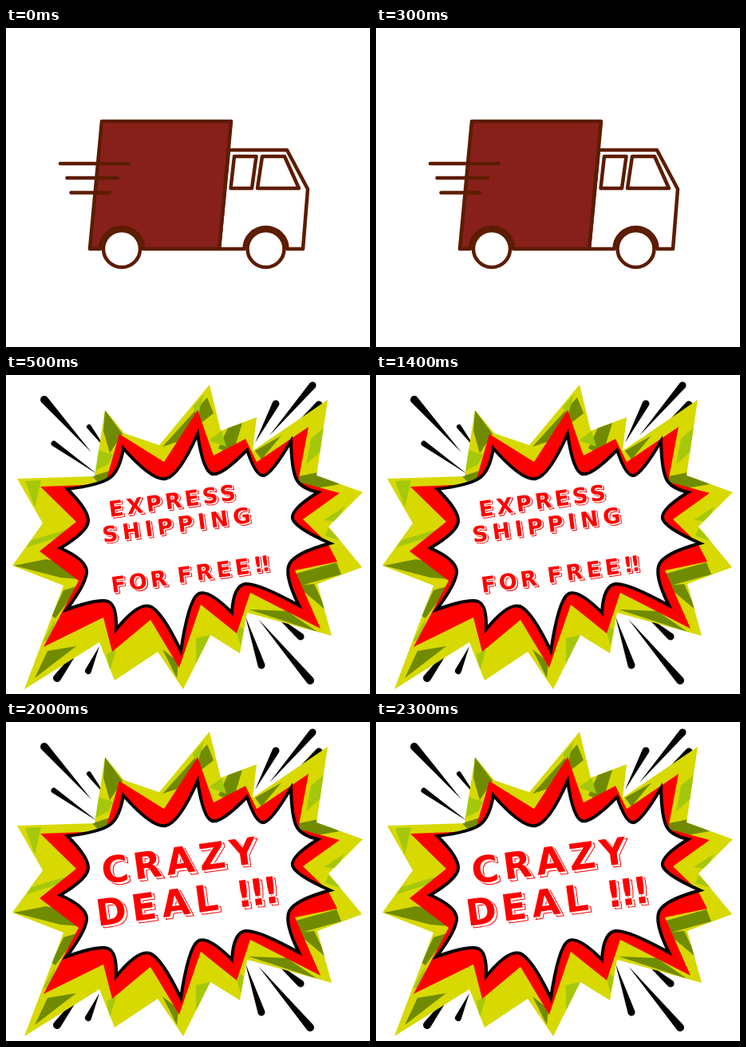
Animation of 456 by 400 pixels, one loop 2500 ms. Source, as an HTML page with a canvas:

```html
<!DOCTYPE html>
<html lang="en">
<head>
<meta charset="utf-8">
<title>Express shipping</title>
<style>
html, body { margin: 0; width: 100%; height: 100%; overflow: hidden; background: #fff; }
canvas { display: block; }
</style>
</head>
<body>
<canvas id="stage" width="456" height="400"></canvas>
<script>
const ctx = document.getElementById('stage').getContext('2d');
const LOOP = 2500, BURST_AT = 500, DEAL_AT = 2000;
const BROWN = '#5c1c00', MAROON = '#87201a', RED = '#ff0000';
const YELLOW = '#d7d900', OLIVE = '#718b00', LIME = '#a5c80a';

function poly(pts, fill, stroke) {
  ctx.beginPath();
  for (let i = 0; i < pts.length; i += 2) ctx.lineTo(pts[i], pts[i + 1]);
  ctx.closePath();
  if (fill) { ctx.fillStyle = fill; ctx.fill(); }
  if (stroke) ctx.stroke();
}

function line(x1, y1, x2, y2) {
  ctx.beginPath();
  ctx.moveTo(x1, y1);
  ctx.lineTo(x2, y2);
  ctx.stroke();
}

function drawTruck() {
  ctx.strokeStyle = BROWN;
  ctx.lineWidth = 4.5;
  ctx.lineCap = ctx.lineJoin = 'round';

  const body = (start, wheelX, fill) => {
    ctx.beginPath();
    for (const [x, y] of start) ctx.lineTo(x, y);
    ctx.arc(wheelX, 277, 27, 0, Math.PI, true);
    ctx.lineTo(wheelX < 200 ? 105 : 267, 277);
    ctx.closePath();
    ctx.fillStyle = fill;
    ctx.fill();
    ctx.stroke();
  };
  body([[279, 153], [352, 153], [378, 202], [372, 277]], 325.5, '#fff');
  body([[120, 117], [282, 117], [267, 277]], 145, MAROON);
  poly([286, 161, 313.5, 161, 308, 201, 281.5, 201], '#fff', true);
  poly([321, 161, 349, 161, 367, 201, 315, 201], '#fff', true);

  for (const x of [145, 325.5]) {
    ctx.beginPath();
    ctx.arc(x, 277, 23, 0, 7);
    ctx.fillStyle = '#fff';
    ctx.fill();
    ctx.stroke();
  }
  line(68, 170, 154, 170);
  line(76.5, 188, 140, 188);
  line(81.5, 206.5, 130, 206.5);
}

// Tapered streak: round head, pointed tail.
function streak(x, y, r, tx, ty) {
  const a = Math.atan2(ty - y, tx - x);
  ctx.fillStyle = '#000';
  ctx.beginPath();
  ctx.arc(x, y, r, a + Math.PI / 2, a - Math.PI / 2);
  ctx.lineTo(tx, ty);
  ctx.fill();
}

// Sharp tips alternating with rounded valleys.
function bubble(p) {
  const n = p.length;
  ctx.beginPath();
  ctx.moveTo(p[0], p[1]);
  for (let i = 0; i < n; i += 4) {
    const [ax, ay, vx, vy] = p.slice(i, i + 4);
    const bx = p[(i + 4) % n], by = p[(i + 5) % n];
    const dx = (bx - ax) * 0.18, dy = (by - ay) * 0.18;
    ctx.quadraticCurveTo(vx - dx, vy - dy, vx, vy);
    ctx.quadraticCurveTo(vx + dx, vy + dy, bx, by);
  }
  ctx.closePath();
  ctx.fillStyle = '#fff';
  ctx.fill();
  ctx.strokeStyle = '#000';
  ctx.lineWidth = 4;
  ctx.lineJoin = 'miter';
  ctx.stroke();
}

function drawBurst() {
  streak(48, 31, 5, 107, 97);
  streak(60, 86, 3.5, 114, 124);
  streak(104, 65, 3, 126, 94);
  streak(338, 36, 4.5, 312, 85);
  streak(384, 13, 4.5, 330, 76);
  streak(392, 37, 4.5, 350, 75);
  streak(64, 380, 5, 98, 334);
  streak(103, 371, 4, 117, 340);
  streak(320, 364, 4.5, 300, 303);
  streak(381, 383, 5, 316, 306);
  streak(369, 328, 4.5, 336, 300);

  ctx.save();
  poly([255, 12, 269, 70, 314, 53, 309, 95, 403, 31, 389, 126, 447, 147, 404, 190,
    446, 241, 390, 262, 408, 327, 302, 298, 293, 349, 256, 326, 222, 394, 190, 347,
    136, 383, 117, 335, 23, 394, 72, 264, 8, 239, 46, 186, 14, 130, 111, 127,
    124, 44, 148, 73, 192, 88], YELLOW);
  ctx.clip();
  [[124, 44, 146, 74, 130, 98, 122, 70], [108, 127, 130, 120, 126, 146],
   [252, 28, 260, 48, 214, 84, 196, 90], [278, 66, 296, 60, 284, 100, 266, 92],
   [312, 95, 345, 76, 320, 106], [362, 128, 391, 122, 418, 137, 366, 146],
   [10, 239, 50, 231, 95, 240, 92, 256, 68, 254],
   [360, 250, 414, 235, 420, 250, 362, 266], [364, 264, 386, 262, 402, 296],
   [36, 380, 52, 346, 88, 340], [72, 270, 92, 264, 62, 305, 57, 302],
   [304, 294, 352, 296, 390, 322], [196, 344, 216, 360, 214, 380]
  ].forEach(p => poly(p, OLIVE));
  [[112, 120, 116, 94, 134, 100, 128, 112], [24, 133, 44, 132, 36, 166],
   [32, 207, 82, 192, 70, 202, 26, 216], [234, 40, 248, 24, 240, 52],
   [254, 82, 270, 70, 276, 90], [382, 80, 398, 66, 394, 96, 376, 112],
   [398, 182, 424, 165, 414, 184], [404, 192, 420, 208, 400, 202],
   [126, 350, 138, 344, 130, 371], [238, 330, 256, 326, 238, 363],
   [284, 306, 298, 320, 294, 340], [46, 334, 62, 306, 58, 332]
  ].forEach(p => poly(p, LIME));
  ctx.restore();

  poly([240, 44, 260, 101, 300, 80, 314, 109, 379, 65, 366, 134, 418, 148, 372, 181,
    403, 211, 415, 234, 362, 245, 394, 318, 306, 273, 289, 324, 244, 288, 217, 367,
    181, 307, 133, 347, 122, 304, 47, 341, 91, 258, 42, 221, 88, 184, 43, 140,
    124, 137, 142, 74, 198, 109], RED);

  bubble([240, 74, 258, 124, 302, 94, 323, 126, 357, 83, 364, 131, 391, 147, 359, 180,
    406, 211, 355, 237, 367, 289, 300, 262, 283, 298, 240, 275, 219, 346, 180, 290,
    138, 319, 128, 284, 76, 294, 101, 245, 68, 217, 103, 184, 77, 143, 130, 129,
    147, 92, 200, 130]);
}

// Red lettering over a thin outlined copy, set on a rising baseline.
function label(text, x, y, size, gap, drop) {
  ctx.save();
  ctx.translate(x, y);
  ctx.rotate(-0.135);
  ctx.font = `bold ${size}px "DejaVu Sans", sans-serif`;
  ctx.letterSpacing = gap + 'px';
  ctx.lineJoin = 'round';
  ctx.strokeStyle = RED;
  ctx.lineWidth = 1;
  ctx.strokeText(text, drop, drop);
  ctx.strokeStyle = '#fff';
  ctx.lineWidth = 2;
  ctx.strokeText(text, 0, 0);
  ctx.fillStyle = RED;
  ctx.fillText(text, 0, 0);
  ctx.restore();
}

function draw(t) {
  ctx.fillStyle = '#fff';
  ctx.fillRect(0, 0, 456, 400);
  if (t < BURST_AT) return drawTruck();
  drawBurst();
  if (t < DEAL_AT) {
    label('EXPRESS', 130, 178, 27, 4, 2);
    label('SHIPPING', 122, 210, 27, 5.8, 2);
    label('FOR', 133, 273, 27, 4, 2);
    label('FREE', 216, 261, 27, 5, 2);
    label('!!', 311, 248, 27, -3, 2);
  } else {
    label('CRAZY', 122, 203, 46, 6, 3);
    label('DEAL', 115, 256, 46, 6.5, 3);
    label('!!!', 290, 233, 46, -4, 3);
  }
}

const start = performance.now();
function tick() {
  draw((performance.now() - start) % LOOP);
  requestAnimationFrame(tick);
}
tick();
</script>
</body>
</html>
```
